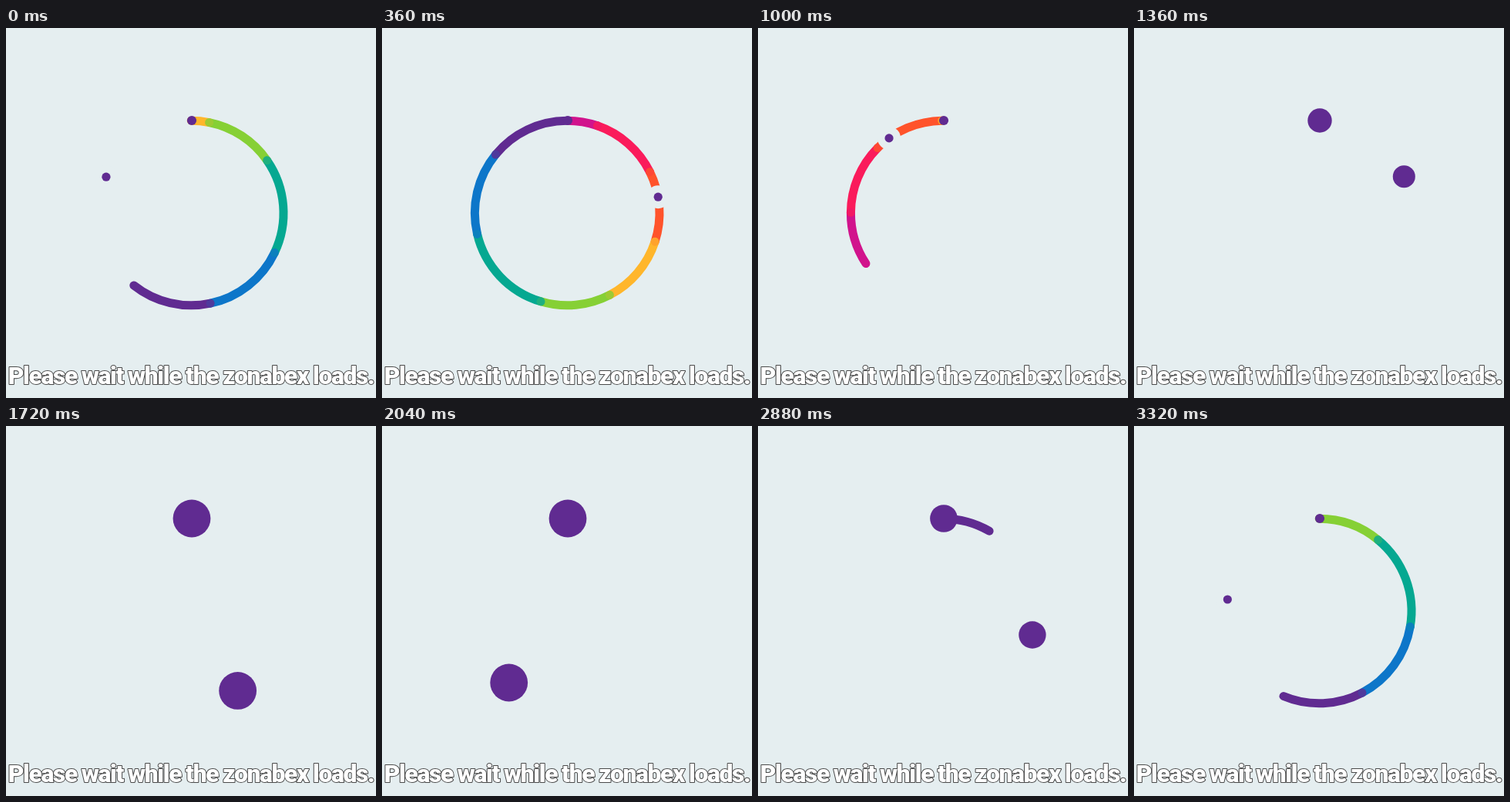
An HTML page for the animation above (3360 ms loop, 480x480 px).

```html
<!DOCTYPE html>
<html lang="en">
<head>
<meta charset="utf-8">
<title>Loading</title>
<style>
  html, body { margin: 0; width: 100%; height: 100%; overflow: hidden; background: #e5eef0; }
  svg { display: block; width: 100%; height: 100%; }
  text {
    font-family: Impact, Roboto, "Open Sans", sans-serif;
    font-weight: 900;
    font-stretch: 75%;
    letter-spacing: -.042em;
    word-spacing: -.02em;
    fill: #fff;
    stroke: #4a4a4a;
    stroke-width: 2;
    stroke-linejoin: round;
    paint-order: stroke;
  }
</style>
</head>
<body>
<svg viewBox="0 0 480 480">
  <g id="trail" fill="none" stroke-width="11" stroke-linecap="round"></g>
  <circle id="gap" r="15" fill="#e5eef0"/>
  <circle id="runner" fill="#602b91"/>
  <circle id="anchor" cx="241" cy="120" fill="#602b91"/>
  <text id="caption" x="240" text-anchor="middle" font-size="30">Please wait while the zonabex loads.</text>
</svg>
<script>
const LOOP = 3360, STEP = 40, RADIUS = 119.8, SPEED = 0.3925;
const HEAD_AT_ZERO = 218.4;

// Segments from the head of the trail to its tail: colour and length in degrees.
const SEGMENTS = [
  ['#602b91', 50.4], ['#0d76c9', 52.5], ['#05a891', 60.2], ['#86d035', 44],
  ['#ffb62b', 44.5], ['#ff532b', 44.5], ['#fa1b5b', 44.5], ['#d1138c', 33.5]
];

// Runner keys: time, angle clockwise from the top, angular speed.
const KEYS = [
  [0, 293, .406], [360, 440, .403], [720, 582, .391], [1360, 786.8, .229],
  [1720, 869.7, .225], [2400, 1015, .214], [2803, 1155, .39],
  [3320, 1357.2, .398], [3360, 1373, .406]
];

const $ = id => document.getElementById(id);
const clamp = (v, lo, hi) => Math.min(hi, Math.max(lo, v));
const smooth = (t, from, to) => {
  const k = clamp((t - from) / (to - from), 0, 1);
  return k * k * (3 - 2 * k);
};
const point = deg => {
  const a = deg * Math.PI / 180;
  return [240.2 + RADIUS * Math.sin(a), 240 - RADIUS * Math.cos(a)];
};
const setAttrs = (el, attrs) => {
  for (const name in attrs) el.setAttribute(name, attrs[name]);
};
const add = (tag, attrs) => {
  const el = document.createElementNS('http://www.w3.org/2000/svg', tag);
  setAttrs(el, attrs);
  return $('trail').appendChild(el);
};

// The head is drawn last so that each cap lies over the segment behind it.
const parts = SEGMENTS.map(([color, length], i) => ({ color, length, i })).reverse();
for (const part of parts) {
  part.path = add('path', { stroke: part.color });
  const behind = SEGMENTS[part.i + 1];
  if (behind) part.joint = add('circle', { r: 5.5, fill: behind[0], opacity: .2 });
}
parts.reverse();

function runnerAngle(t) {
  const i = KEYS.findIndex(key => key[0] > t);
  const [t0, p0, v0] = KEYS[i - 1], [t1, p1, v1] = KEYS[i];
  const d = t1 - t0, k = (t - t0) / d, k2 = k * k, k3 = k2 * k;
  return p0 * (2 * k3 - 3 * k2 + 1) + v0 * d * (k3 - 2 * k2 + k)
    + p1 * (3 * k2 - 2 * k3) + v1 * d * (k3 - k2);
}

function drawTrail(t) {
  let front = HEAD_AT_ZERO + SPEED * (t < 1600 ? t : t - LOOP);
  for (const { length, path, joint } of parts) {
    const back = front - length;
    const a = clamp(back, 0, 360), b = clamp(front, 0, 360);
    path.setAttribute('d', b > a
      ? `M${point(a)}A${RADIUS} ${RADIUS} 0 0 1 ${point(b)}` : '');
    if (joint) {
      const [cx, cy] = point(back);
      setAttrs(joint, { cx, cy, visibility: back > 0 && back < 360 ? 'visible' : 'hidden' });
    }
    front = back;
  }
}

function draw(t) {
  drawTrail(t);
  const [cx, cy] = point(runnerAngle(t));
  const shrink = smooth(t, 2765, 3050);
  const anchorSize = smooth(t, 1205, 1505) - shrink;
  const runnerSize = smooth(t, 1215, 1515) - shrink;
  setAttrs($('gap'), { cx, cy });
  setAttrs($('runner'), { cx, cy, r: 5.6 + 18.8 * runnerSize });
  setAttrs($('anchor'), { r: 6.1 + 18.3 * anchorSize });
}

function fitCaption() {
  const caption = $('caption');
  const size = Math.min(36, 30 * 475 / caption.getComputedTextLength());
  setAttrs(caption, { 'font-size': size, y: 450.5 + size * .36 });
}

const start = performance.now();
function tick() {
  const t = (performance.now() - start) % LOOP;
  draw(Math.floor(t / STEP) * STEP);
  requestAnimationFrame(tick);
}
fitCaption();
draw(0);
requestAnimationFrame(tick);
</script>
</body>
</html>
```
